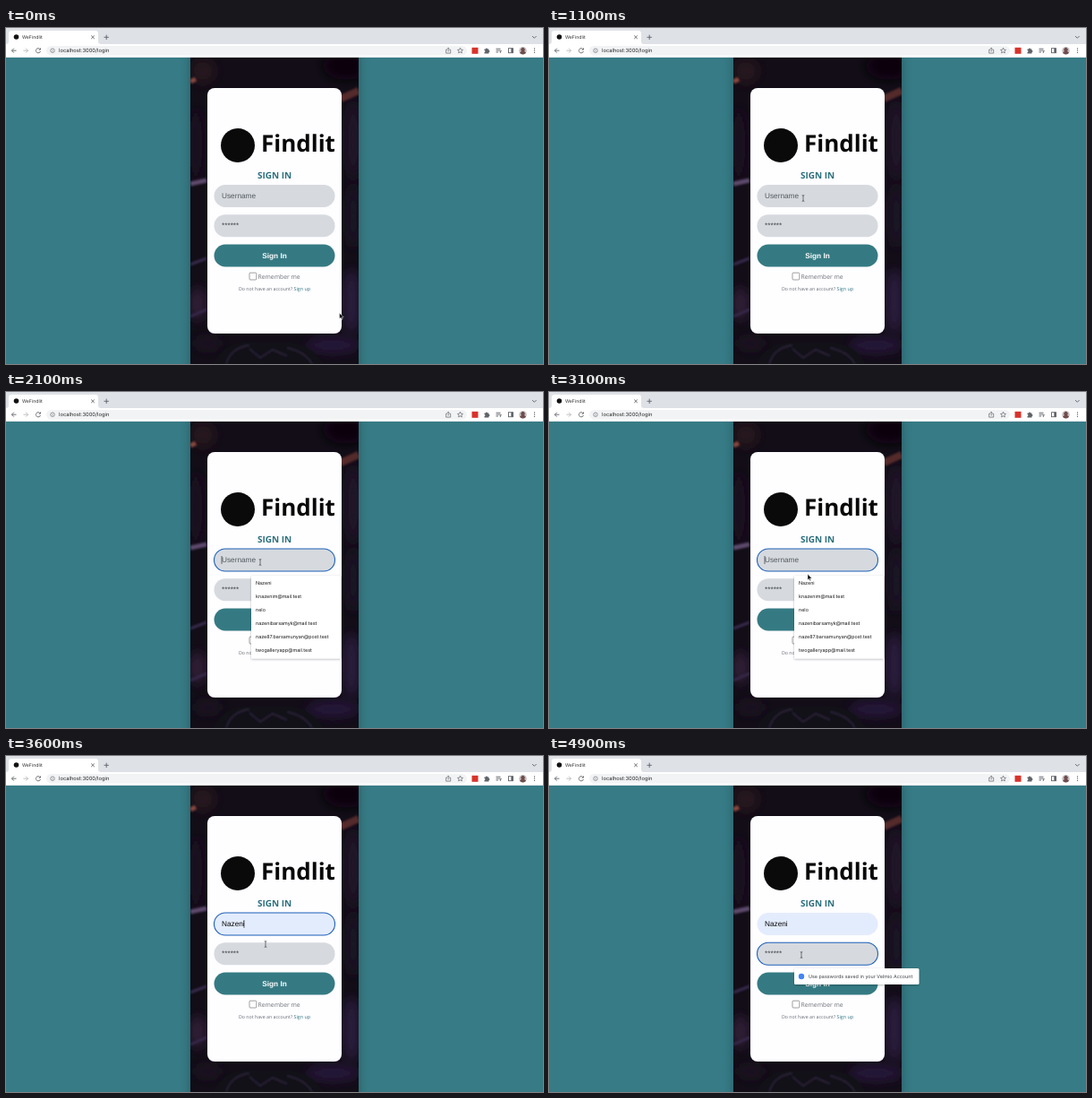
An HTML page for the animation above (5000 ms loop, 600x375 px).

```html
<!DOCTYPE html>
<html lang="en">
<head>
<meta charset="utf-8">
<title>WeFindlit</title>
<style>
  html, body { margin: 0; width: 100%; height: 100%; overflow: hidden; background: #367b85; }
  svg { display: block; width: 100%; height: 100%; text-rendering: geometricPrecision; }
  .ui { font-family: Inter, Roboto, sans-serif; }
  .form { font-family: "Liberation Sans", Arial, sans-serif; font-size: 8.25px; }
  .page { font-family: "Open Sans", "Noto Sans", sans-serif; }
  .icon { fill: none; stroke: #5f6368; stroke-width: .9; }
  .ring { fill: none; stroke: #1d60b8; stroke-width: 1.1; }
  .caret { stroke: #111; stroke-width: .6; }
</style>
</head>
<body>
<svg viewBox="0 0 600 375" xmlns="http://www.w3.org/2000/svg">
  <defs>
    <clipPath id="column"><rect x="206" y="33" width="188" height="342"/></clipPath>
    <clipPath id="view"><rect y="33" width="600" height="342"/></clipPath>
    <filter id="soft" x="-60%" y="-60%" width="220%" height="220%"><feGaussianBlur stdDeviation="6"/></filter>
    <filter id="haze" x="-60%" y="-60%" width="220%" height="220%"><feGaussianBlur stdDeviation="1"/></filter>
    <filter id="lift" x="-10%" y="-20%" width="120%" height="150%">
      <feDropShadow dx="0" dy=".8" stdDeviation="1.2" flood-color="#000" flood-opacity=".3"/>
    </filter>
  </defs>

  <!-- page -->
  <rect width="600" height="375" fill="#367b85"/>
  <g clip-path="url(#view)">
    <rect x="206" y="28" width="188" height="360" fill="#000" opacity=".25" filter="url(#soft)"/>
  </g>
  <g clip-path="url(#column)">
    <rect x="206" y="33" width="188" height="342" fill="#120d17"/>
    <g filter="url(#soft)">
      <ellipse cx="220" cy="48" rx="14" ry="14" fill="#25131b"/>
      <ellipse cx="380" cy="42" rx="26" ry="16" fill="#08060a"/>
      <ellipse cx="388" cy="125" rx="9" ry="44" fill="#20152c"/>
      <ellipse cx="212" cy="130" rx="7" ry="40" fill="#1b1122"/>
      <ellipse cx="388" cy="210" rx="8" ry="36" fill="#1b1226"/>
      <ellipse cx="214" cy="308" rx="11" ry="18" fill="#2d1a34"/>
      <ellipse cx="386" cy="305" rx="10" ry="36" fill="#2a1a3c"/>
      <ellipse cx="365" cy="354" rx="30" ry="9" fill="#28163a"/>
      <ellipse cx="225" cy="352" rx="16" ry="7" fill="#1f1224"/>
    </g>
    <g fill="none" filter="url(#haze)">
      <path d="M206 60l6-3" stroke="#86463c" stroke-width="5"/>
      <path d="M374 79l20-9" stroke="#55292a" stroke-width="8"/>
      <path d="M206 174l18-4" stroke="#5d4a6c" stroke-width="5"/>
      <path d="M206 264l18-7M206 322l18-8" stroke="#382a4c" stroke-width="3"/>
    </g>
    <path d="M232 375q8-20 32-24h54q24 3 36 24z" fill="#121118"/>
    <path d="M246 375q5-18 26-21M272 358l12 10 14-9 16 7M314 357q20 4 28 18" fill="none" stroke="#2c2438" stroke-width="2" filter="url(#haze)"/>
  </g>
  <rect x="225" y="67" width="150" height="274" rx="8" fill="#fefdff"/>

  <!-- browser -->
  <g class="ui">
    <rect width="600" height="18" fill="#dee1e6"/>
    <path d="M0 18q3 0 3-3V6q0-3 3-3h94q3 0 3 3v9q0 3 3 3z" fill="#fff"/>
    <rect y="18" width="600" height="15" fill="#fff"/>
    <rect y="32.5" width="600" height=".5" fill="#d5d8dc"/>
    <circle cx="11.5" cy="10" r="2.8" fill="#111"/>
    <text x="18" y="12" font-size="5.2" fill="#333">WeFindlit</text>
    <path class="icon" d="M95.2 8.5l3.6 3.6m0-3.6l-3.6 3.600M109.500 10.300h5.400m-2.700-2.700v5.400M588 9l2.300 2.300L592.600 9"/>
    <rect x="45" y="20" width="470" height="10.500" rx="5.250" fill="#f1f3f4"/>
    <path class="icon" d="M11.500 25.200h-5m2.400-2.500l-2.500 2.500 2.500 2.500"/>
    <path class="icon" style="stroke:#b5b8bc" d="M19.500 25.200h5m-2.400-2.500l2.500 2.500-2.500 2.500"/>
    <path class="icon" d="M38.200 23.800a2.600 2.600 0 1 0 .3 2.200m0-3.600v1.800h-1.800"/>
    <circle class="icon" cx="52" cy="25.200" r="2.300" style="stroke-width:.6"/>
    <path class="icon" d="M52 24.900v1.500m0-2.600v.5" style="stroke-width:.6"/>
    <text x="59" y="27.200" font-size="5.800" fill="#222">localhost:3000/login</text>
    <path class="icon" style="stroke-width:.7" d="M493 24.200h-1.300v3.900h5v-3.900h-1.300M494.200 26.500v-4.300m-1.300 1.200l1.300-1.300 1.300 1.300"/>
    <path class="icon" style="stroke-width:.7" d="M507.500 22.200l.9 2 2.100.2-1.600 1.400.5 2.100-1.900-1.100-1.900 1.100.5-2.100-1.600-1.400 2.100-.2z"/>
    <rect x="520.500" y="21.800" width="7" height="7" fill="#d8332b"/>
    <path d="M534.500 23.600h1.500a1 1 0 0 1 2 0h1.500v1.500a1 1 0 0 1 0 2v1.300h-5v-1.500a.9.900 0 0 0 0-1.800z" fill="#5f6368"/>
    <path class="icon" d="M547.500 23.200h5m-5 1.900h5m-5 1.900h2.500m2.300 1v-2.300h1.500"/>
    <rect class="icon" x="561.500" y="22.700" width="5" height="5"/>
    <rect x="564.300" y="22.700" width="2.200" height="5" fill="#5f6368"/>
    <circle cx="577.500" cy="25.200" r="4.300" fill="#c9c2c4"/>
    <path d="M574 27.700a4.300 4.300 0 0 0 7 0q-1-1.500-2.200-1.700a2.200 2.200 0 1 0-2.600 0q-1.200.2-2.200 1.700z" fill="#6e4d4c"/>
    <g fill="#5f6368"><circle cx="590.500" cy="23" r=".65"/><circle cx="590.500" cy="25.200" r=".65"/><circle cx="590.500" cy="27.400" r=".65"/></g>
  </g>

  <!-- form -->
  <circle cx="259" cy="131" r="19" fill="#0a0a0a"/>
  <g class="page">
    <text x="285" y="138" font-size="26" font-weight="700" fill="#080808">Findlit</text>
    <text x="300" y="168" font-size="10" font-weight="700" fill="#2d717e" text-anchor="middle">SIGN IN</text>
    <text x="281.500" y="280" font-size="6.800" fill="#6c7278">Remember me</text>
    <text x="260" y="293.400" font-size="5.250" fill="#666c72">Do not have an account?</text>
    <text x="321.500" y="293.400" font-size="5.350" fill="#2b7580">Sign up</text>
  </g>
  <rect x="272" y="273.200" width="7.800" height="7.800" rx="1" fill="#fff" stroke="#777" stroke-width=".7"/>
  <g class="form">
    <rect id="user" x="232.500" y="175" width="135" height="25" rx="12.500"/>
    <rect x="232.500" y="208.200" width="135" height="25" rx="12.500" fill="#d6dadf"/>
    <rect x="232.500" y="241.500" width="135" height="25" rx="12.500" fill="#357a83"/>
    <text id="name" x="241" y="190.300"></text>
    <text x="241" y="223.200" fill="#42474c">******</text>
    <text x="300" y="256.800" font-weight="700" fill="#fff" text-anchor="middle">Sign In</text>
  </g>
  <rect id="ring" class="ring" x="232.500" width="135" height="25" rx="12.500"/>
  <path id="caret" class="caret" d="M0-4.500v9"/>

  <!-- popups -->
  <g id="menu" class="ui" font-size="5.400" fill="#151515">
    <rect x="274" y="205" width="100" height="92.500" rx="1" fill="#fff" filter="url(#lift)"/>
    <rect id="hover" x="274" y="205.500" width="100" height="15" fill="#e8e8e9"/>
  </g>
  <g id="hint" class="ui">
    <rect x="274" y="237" width="139.500" height="18" rx="1.500" fill="#fff" filter="url(#lift)"/>
    <circle cx="282" cy="246" r="3.200" fill="#4285f4"/>
    <text x="290" y="248" font-size="5.400" fill="#3c3f44">Use passwords saved in your Velmio Account</text>
  </g>

  <path id="arrow" d="M0 0v6.600l1.500-1.400 1 2.300 1.100-.5-1-2.200h2.100z" fill="#000" stroke="#fff" stroke-width=".5"/>
  <path id="beam" d="M-1.300-3.500q1.300 0 1.300 1.200v4.600q0 1.200-1.300 1.200M1.300-3.500q-1.300 0-1.300 1.200M1.300 3.500q-1.300 0-1.300-1.200" fill="none" stroke="#2a2a2a" stroke-width=".6"/>
</svg>
<script>
const LOOP = 5000, STEP = 100;
const USER = "Nazeni";
const $ = id => document.getElementById(id);
const show = (id, on) => $(id).style.display = on ? "" : "none";
const move = (id, x, y) => $(id).setAttribute("transform", `translate(${x} ${y})`);
const within = (t, a, b) => t >= a && t < b;

const saved = [USER, "knazenim@mail.test", "nelo", "nazenibarsamyk@mail.test",
  "naze87.barsamunyan@post.test", "twogalleryapp@mail.test"];
saved.forEach((label, i) => {
  const row = document.createElementNS("http://www.w3.org/2000/svg", "text");
  row.setAttribute("x", 279);
  row.setAttribute("y", 215 + i * 15);
  row.textContent = label;
  $("menu").append(row);
});

// pointer stops: time, x, y
const stops = [[0, 372.5, 318], [400, 372.5, 318], [1000, 284, 194], [1100, 284, 190],
  [2800, 284, 190], [3100, 289, 203.3], [3400, 290, 210], [3700, 290, 210],
  [4200, 282, 222], [LOOP, 282, 222]];

function pointer(t) {
  const i = stops.findIndex(s => s[0] > t);
  const [t0, x0, y0] = stops[i - 1], [t1, x1, y1] = stops[i];
  const p = (t - t0) / (t1 - t0), e = p * p * (3 - 2 * p);
  return [x0 + (x1 - x0) * e, y0 + (y1 - y0) * e];
}

function draw(t) {
  const previewed = t >= 3300, filled = t >= 3500;
  const onUser = within(t, 1900, 4100), onPass = t >= 4100;

  $("user").setAttribute("fill", previewed ? "#e3ecfd" : "#d6dadf");
  $("name").textContent = previewed ? USER : "Username";
  $("name").setAttribute("fill", previewed ? "#080808" : "#52585e");

  show("ring", onUser || onPass);
  $("ring").setAttribute("y", onPass ? 208.2 : 175);
  $("ring").setAttribute("opacity", within(t, 1900, 2000) || within(t, 4100, 4200) ? 0.5 : 1);

  show("caret", within(t, 2000, 2600) || within(t, 3100, 3300) ||
    within(t, 3500, 4000) || within(t, 4200, 4700));
  move("caret", filled && !onPass ? 266 : 241, onPass ? 221 : 187.5);

  show("menu", within(t, 2000, 3500));
  show("hover", t >= 3200);
  show("hint", t >= 4200);

  const [x, y] = pointer(t);
  const inField = within(x, 232, 368) && (within(y, 175, 200) || within(y, 208, 234));
  const overMenu = within(t, 2000, 3600) && y > 200;
  const beam = inField && !overMenu;
  show("beam", beam);
  show("arrow", !beam);
  move(beam ? "beam" : "arrow", x, y);
}

function tick() {
  const t = performance.now() % LOOP;
  draw(Math.floor(t / STEP) * STEP);
  requestAnimationFrame(tick);
}
tick();
</script>
</body>
</html>
```
